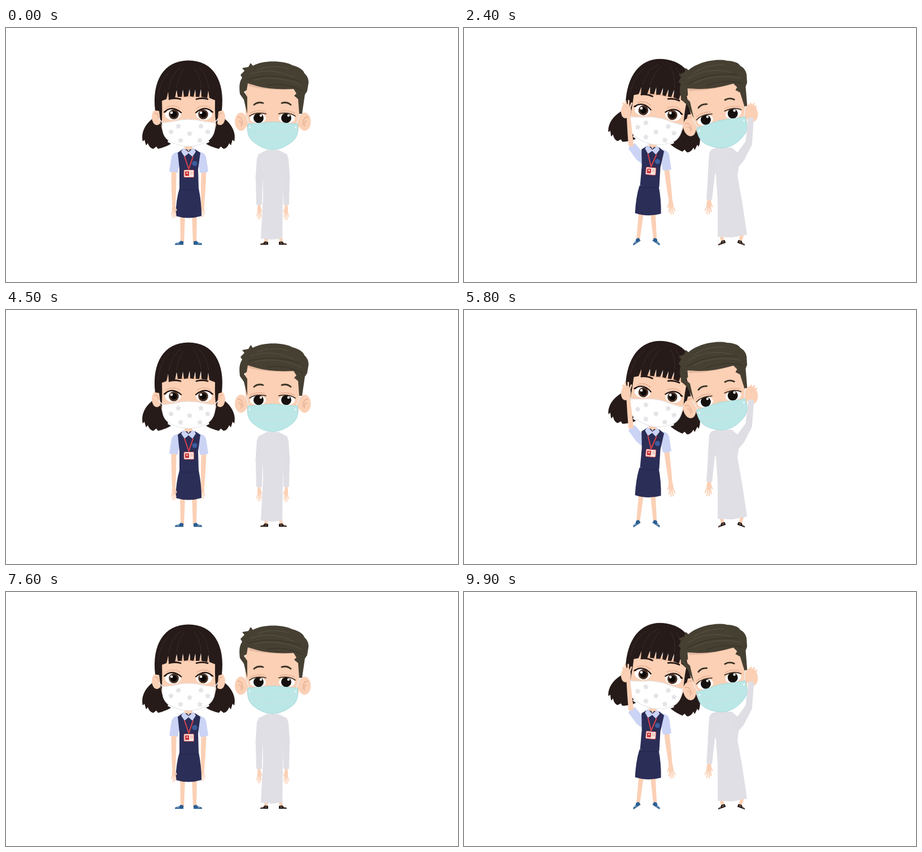
These frames come from a looping animation (800 px wide and 450 px high, 10000 ms). An HTML page:

```html
<!DOCTYPE html>
<html lang="en">
<head>
<meta charset="utf-8">
<title>Waving children</title>
<style>
html, body { margin: 0; width: 100%; height: 100%; overflow: hidden; background: #fff; }
svg { display: block; width: 100vw; height: 100vh; }
.skin { fill: #fbd0b5; }
.fold { fill: none; stroke: #e2a98c; stroke-width: 1.2; stroke-linecap: round; }
.hair { fill: #261b19; }
.navy { fill: #2b2e57; }
.shirt { fill: #cbd4f5; }
.robe { fill: #e0dfe5; }
.sleeve { fill: #dfdee4; }
.line { fill: none; stroke-linecap: round; stroke-linejoin: round; }
</style>
</head>
<body>
<svg viewBox="0 0 800 450">
  <defs>
    <g id="hand">
      <path class="skin" d="M-3.5 -2 L3.5 -2 Q6 6 4.5 12 Q0 15 -4.5 12 Q-6 6 -3.5 -2Z"/>
      <path class="line" stroke="#fbd0b5" stroke-width="2.5" d="M-3 10 L-7 19 M-1 11 L-2.5 24 M1.5 11 L2.5 24 M3.5 10 L6.5 20 M3 4 L8 11"/>
    </g>
    <path id="girlSleeve" class="shirt" d="M5 -13 Q-8 -12 -10 -4 L-14 22 Q-6 26 1 24 L6 0Z"/>
    <path id="girlFore" class="skin" d="M-4.5 -1 L4.5 -1 Q4.5 24 3 57 L-3 57 Q-4.5 24 -4.5 -1Z"/>
    <path id="boySleeve" class="sleeve" d="M8 -9 Q-6 -11 -9 0 L-11.5 37 Q-5 43 1.5 37 L8 8Z"/>
    <path id="boyFore" class="sleeve" d="M-6 -2 Q0 -7 6 -2 L5 45 Q0 47 -5 45Z"/>

    <path id="pigtail" class="hair" d="M274 152 C254 160 237 180 242 201 L245 198 L248 208 L251 204 C253 210 257 214 261 214 L266 210 L269 214 C279 212 287 208 292 205 L286 202 C292 190 288 165 280 152Z"/>
    <g id="girlEar">
      <ellipse class="skin" cx="267" cy="158" rx="9" ry="14"/>
      <path class="fold" d="M263 151 Q270 150 270 161"/>
    </g>
    <g id="girlEye">
      <ellipse cx="295.5" cy="153" rx="14" ry="10" fill="#fff"/>
      <circle cx="297" cy="153" r="8.8" fill="#4a3226"/>
      <circle cx="297" cy="153" r="5.8" fill="#0d0908"/>
      <path class="line" stroke="#21120d" stroke-width="2.2" d="M280 149 Q294 136 310 150 M280 149 L283 148"/>
      <path class="fold" d="M284 142 Q295 134 308 142"/>
      <path class="line" stroke="#281a16" stroke-width="2.8" d="M289 126 Q299 123 309 126"/>
    </g>
    <g id="girlLid">
      <path fill="#efc5aa" d="M281 148 Q294 134 310 149 Q296 148 281 148Z"/>
      <path class="line" stroke="#59483e" stroke-width="1.8" d="M280 148 Q296 147 311 149"/>
    </g>
    <path id="star" fill="#e4e4e8" stroke="#e4e4e8" stroke-width="1.6" stroke-linejoin="round" d="M0 -3.8 L1.7 -1.8 L3.8 -1.2 L2.4 .9 L2.4 3.3 L0 2.6 L-2.4 3.3 L-2.4 .9 L-3.8 -1.2 L-1.7 -1.8Z"/>
    <path id="girlLeg" class="skin" d="M308 330 L317 330 L315 381 L309 381Z"/>
    <g id="shoe">
      <path fill="#2b5f94" d="M299 383 Q300 380 306 380 L309 377 L314 378 L314 384 L299 384Z"/>
      <path class="line" stroke="#cfdbe6" stroke-width="1" d="M299 384.5 L313 384.5 M302 381 L306 382"/>
    </g>
    <g id="boyEar">
      <ellipse class="skin" cx="416" cy="166" rx="11" ry="16"/>
      <path class="fold" d="M410 158 Q419 157 419 172 M412 165 Q418 164 416 174"/>
    </g>
    <g id="boyEye">
      <ellipse cx="446" cy="160" rx="14" ry="9" fill="#fff"/>
      <circle cx="447" cy="159.5" r="9" fill="#15100d"/>
      <path class="line" stroke="#4a382c" stroke-width="1.8" d="M431 156 Q443 148 460 152"/>
      <path class="fold" d="M432 151 Q445 144 458 148"/>
      <path class="line" stroke="#3b3226" stroke-width="2.8" d="M439 136 Q446 130 455 133"/>
    </g>
    <g id="boyLid">
      <path fill="#efc5aa" d="M431 157 Q445 143 461 157 Q446 155 431 157Z"/>
      <path class="line" stroke="#59483e" stroke-width="1.8" d="M431 157 Q446 155 461 157"/>
    </g>
    <g id="sandal">
      <path class="skin" d="M458 366 L464 366 L463 381 L457 381Z"/>
      <path fill="#231a19" d="M450 383 Q452 380.5 456 380.5 L458 378 L464 379 L464 384 L450 384Z"/>
      <path class="line" stroke="#d9a688" stroke-width="1.2" d="M452 381.5 L455 382 M459 381 L461 381"/>
    </g>
  </defs>

  <g id="girl">
    <g class="girlHead">
      <use href="#pigtail"/><use href="#pigtail" transform="translate(646) scale(-1 1)"/>
    </g>
    <g id="legL"><use href="#girlLeg"/></g>
    <g id="legR"><use href="#girlLeg" transform="translate(646) scale(-1 1)"/></g>
    <g id="shoeL"><use href="#shoe"/></g>
    <g id="shoeR"><use href="#shoe" transform="translate(646) scale(-1 1)"/></g>
    <g class="girlRest"><g class="fore"><use href="#girlFore"/><g class="palm"><use href="#hand"/></g></g><use href="#girlSleeve"/></g>
    <g class="girlWave"><use href="#girlSleeve"/></g>
    <g id="skirt">
      <path class="navy" d="M307 284 L341 284 Q346 308 346 333 Q323 340 300 333 Q301 304 307 284Z"/>
      <path class="line" stroke="#22244a" d="M308 287 L340 287"/>
    </g>
    <g id="torso">
      <path class="skin" d="M316 204 H330 V222 H316Z"/>
      <path class="navy" d="M304 221 L312 215 L335 215 L344 221 L340 250 L341 285 Q324 288 307 285 L307 250Z"/>
      <path class="shirt" d="M314 212 L323 220 L332 212 L336 219 L330 228 L323 222 L316 228 L310 219Z"/>
      <path class="skin" d="M317 209 L329 209 L323 219Z"/>
      <path class="line" stroke="#d8424a" stroke-width="2" d="M316 228 L323.5 250 L331 228"/>
      <circle cx="334" cy="240" r="4.5" fill="#3c5d9d"/>
      <rect x="315" y="251.5" width="17.5" height="13" rx="1.5" fill="#f8e7df" stroke="#d8525a" stroke-width="1"/>
      <path fill="#cf3038" d="M317 254 H324 V262 H317Z"/>
      <circle cx="320.5" cy="257" r="1.5" fill="#f4d4c6"/>
      <path stroke="#db9e9a" d="M326 255.5 H331 M326 258.5 H331"/>
    </g>
    <g class="girlHead">
      <use href="#girlEar"/><use href="#girlEar" transform="translate(646) scale(-1 1)"/>
      <path class="skin" d="M273 115 L373 115 C378 160 372 185 358 199 Q323 221 288 199 C274 185 268 160 273 115Z"/>
      <path fill="#edbda1" d="M278 119 H369 V124 Q323 121 278 125Z"/>
      <use href="#girlEye"/><use href="#girlEye" transform="translate(646) scale(-1 1)"/>
      <circle cx="293" cy="150" r="2.3" fill="#fff"/><circle cx="345" cy="150" r="2.3" fill="#fff"/>
      <g class="lids"><use href="#girlLid"/><use href="#girlLid" transform="translate(646) scale(-1 1)"/></g>
      <path class="hair" d="M264 146 C258 94 279 57.5 323 57.5 C367 57.5 388 94 382 146 L376 148 L373 178 Q369 158 370 128 L360 124 L358 111 L356 124 L346 122 L345 108 L342 122 L336 122 L335 109 L332 122 L326 121 L325 108 L322 121 L315 122 L313 109 L311 122 L304 122 L302 110 L299 124 L288 125 L287 113 L284 126 L276 129 Q277 158 275 178 L271 147Z"/>
      <path class="line" stroke="#40312c" stroke-width=".8" d="M288 108 Q292 80 310 69 M302 106 Q304 86 315 72 M345 105 Q344 85 333 71 M359 108 Q356 82 342 70 M269 125 Q271 95 288 78"/>
      <path class="line" stroke="#eeeef1" stroke-width="1.5" d="M270 160 L279 170 M376 160 L367 170"/>
      <path fill="#fff" stroke="#e3e3e8" d="M277 168 Q297 166 308 163 Q323 161 338 163 Q350 166 370 168 C371 184 366 197 352 203 Q323 217 294 203 C280 197 275 184 277 168Z"/>
      <g id="stars"></g>
    </g>
    <g class="girlWave"><g class="fore"><use href="#girlFore"/><g class="palm"><use href="#hand"/></g></g></g>
  </g>

  <g id="boy">
    <g id="sandalL"><use href="#sandal"/></g>
    <g id="sandalR"><use href="#sandal" transform="translate(947) scale(-1 1)"/></g>
    <g class="boyRest"><g class="fore"><g class="palm"><use href="#hand"/></g><use href="#boyFore"/></g><use href="#boySleeve"/></g>
    <path id="robe" class="robe"/>
    <g id="sheer">
      <path fill="#fff" d="M455 306 L492 306 L504 372 L454 372Z"/>
      <path class="skin" d="M460 307 H470 L467 374 H460Z M480 307 H488 V374 H481Z"/>
      <path fill="#ec9aa8" d="M458 293 H487 V308 H459Z"/>
    </g>
    <g class="boyHead">
      <use href="#boyEar"/><use href="#boyEar" transform="translate(944.5) scale(-1 1)"/>
      <path class="skin" d="M424 95 L519 100 C523 160 520 184 510 197 Q472 225 434 197 C424 184 422 150 424 95Z"/>
      <path fill="#e3b89f" d="M428 98 Q448 106 484 106 L514 108 Q465 112 430 103Z"/>
      <use href="#boyEye"/><use href="#boyEye" transform="translate(943) scale(-1 1)"/>
      <circle cx="451" cy="155" r="2.2" fill="#fff"/><circle cx="500" cy="155" r="2.2" fill="#fff"/>
      <g class="lids"><use href="#boyLid"/><use href="#boyLid" transform="translate(943) scale(-1 1)"/></g>
      <path fill="#464033" d="M427 152 L421 127 L414 117 C412 101 414 94 418 88 L415 83 L422 76 L418 71 L429 69 L433 62 L437 67 C457 56 492 58 507 66 Q525 71 528 80 Q536 87 535.5 97 L533 112 L529 118 L524 152 L519 152 L517 126 L510 120 L514 116 L509 108 Q470 110 445 103 L428 98 L426 110 L421 113 L427 122Z"/>
      <path class="line" stroke="#5b5342" d="M432 82 Q470 68 510 88 M440 92 Q480 82 524 102 M445 74 Q470 64 500 72"/>
      <path class="line" stroke="#352f25" d="M428 91 Q470 78 520 94 M462 101 Q495 96 525 111"/>
      <path class="line" stroke="#e8edee" stroke-width="1.5" d="M425 153 L430 171 M520 153 L514 171"/>
      <path fill="#bbe7e7" stroke="#a9dadb" d="M428 170 Q449 169 462 167 Q472 166 482 167 Q496 169 516 170 C518 186 515 194 507 201 Q472 230 437 201 C429 194 426 185 428 170Z"/>
      <path class="line" stroke="#c9dfe0" d="M432 182 Q472 187 512 181 M435 193 Q472 199 509 192"/>
      <circle cx="431.5" cy="176" r="1.6" fill="#eff9f9"/><circle cx="512.5" cy="176" r="1.6" fill="#eff9f9"/>
    </g>
    <g class="boyWave"><g class="fore"><g class="palm"><use href="#hand"/></g><use href="#boyFore"/></g><use href="#boySleeve"/></g>
  </g>
</svg>
<script>
const LOOP = 10000, STEP = 100, FIRST = 760, CYCLE = 3640, WAVE = 230;
const $ = s => document.querySelector(s);
const move = (s, value) => document.querySelectorAll(s).forEach(e => e.setAttribute('transform', value));
const fade = (s, value) => document.querySelectorAll(s).forEach(e => e.setAttribute('opacity', value));
const mix = (a, b, k) => a + (b - a) * k;
const smooth = (a, b, p) => {
  const x = Math.min(1, Math.max(0, (p - a) / (b - a)));
  return x * x * (3 - 2 * x);
};
const upDown = (p, a, b, c, d) => smooth(a, b, p) - smooth(c, d, p);

$('#stars').innerHTML = [[292, 184], [305, 174], [325, 187], [345, 174], [357, 184], [309, 199], [343, 199]]
  .map(([x, y]) => `<use href="#star" transform="translate(${x} ${y})"/>`).join('');

// Outline of the robe, standing and leaning
const standing = [[462,216], [482,216], [498,224], [492,262], [490,300], [489,373], [470,375], [451,373], [455,300], [454,262], [446,224]];
const leaning = [[453,212], [474,212], [489,225], [484,262], [492,306], [501,366], [475,371], [449,370], [449,306], [446,262], [439,222]];

function arm(name, side, x, y, elbow, wrist, upper, lower, spread, bend = 0) {
  move(name, `translate(${x} ${y}) scale(${side} 1) rotate(${upper})`);
  move(`${name} .fore`, `translate(${elbow}) rotate(${lower - upper})`);
  move(`${name} .palm`, `translate(0 ${wrist}) rotate(${bend}) scale(${spread} 1)`);
}

function draw(t) {
  const p = t < FIRST ? 0 : (t - FIRST) % CYCLE;
  const lift = upDown(p, 100, 480, 2150, 2440);
  const raise = upDown(p, 150, 550, 2160, 2640);
  const lean = .9 * smooth(100, 560, p) + .1 * smooth(700, 900, p) - smooth(2160, 3240, p) ** 1.2;
  const lag = lean - lift;
  const blink = upDown(p, 2290, 2390, 2410, 2520);
  const swing = upDown(p, 660, 800, 2080, 2160) * (.5 + .5 * Math.cos(2 * Math.PI * (p - 1640) / WAVE));
  const lower = 193 * raise - 46 * raise ** 2 + 28 * swing;
  const bend = 70 * raise * (1 - raise);
  const spread = mix(.6, 1.1, raise);

  move('.girlHead', `translate(${11 * lift + 2.5 * lag} ${-3.7 * lift + 2 * lag}) rotate(${9.2 * lean} 323 210)`);
  move('#torso', `translate(${4.5 * lift + 1.5 * lag} ${-4.5 * lift}) rotate(${5 * lift} 324 286)`);
  move('#skirt', `translate(${3.5 * lift} ${-4.5 * lift}) rotate(${lift} 324 286)`);
  move('#legL', `translate(${lift} ${-4 * lift}) rotate(${6 * lift} 313 333)`);
  move('#legR', `translate(${lift} ${-4 * lift}) rotate(${-4 * lift} 335 333)`);
  move('#shoeL', `translate(${-lift} ${-2 * lift}) rotate(${-34 * lift} 305 382)`);
  move('#shoeR', `translate(${lift} ${-2 * lift}) rotate(${34 * lift} 341 382)`);
  arm('.girlWave', 1, 303 + 6.5 * lift + lag, 232 - 3 * lift, '-6 24', 56, 132 * raise, lower, spread, bend);
  arm('.girlRest', -1, 344 + 9 * lift + 4 * lag, 232 - 4 * lift, '-6 24', 54, 0, mix(-2, 7, lean), mix(.6, .8, lean));

  move('.boyHead', `translate(${-7 * lift - 2 * lag} ${-4 * lift + 1.5 * lag}) rotate(${-13 * lean ** 2} 472 216)`);
  move('#sandalL', `translate(${-lift} ${-lift}) rotate(${-20 * lift} 457 382)`);
  move('#sandalR', `translate(${lift} ${-lift}) rotate(${20 * lift} 490 382)`);
  $('#robe').setAttribute('d', 'M' + standing.map(([x, y], i) =>
    [mix(x, leaning[i][0], lean) + 4 * lag, mix(y, leaning[i][1], lean) + 4 * lag]).join('L') + 'Z');
  arm('.boyWave', -1, 491 - 7 * lift - 3 * lag, 231 + 5 * lift + 2 * lag, '-5 37', 47, 148 * raise - 8 * raise ** 2, lower, spread, bend);
  arm('.boyRest', 1, 453 - 10 * lift - 5 * lag, 231 - 9 * lift, '-5 37', 46, 0, 5 * lean, mix(.6, .8, lean));

  fade('.lids', blink * .85);
  fade('#sheer', blink * .35);
}

function frame() {
  draw(Math.floor(performance.now() % LOOP / STEP) * STEP);
  requestAnimationFrame(frame);
}
frame();
</script>
</body>
</html>
```
